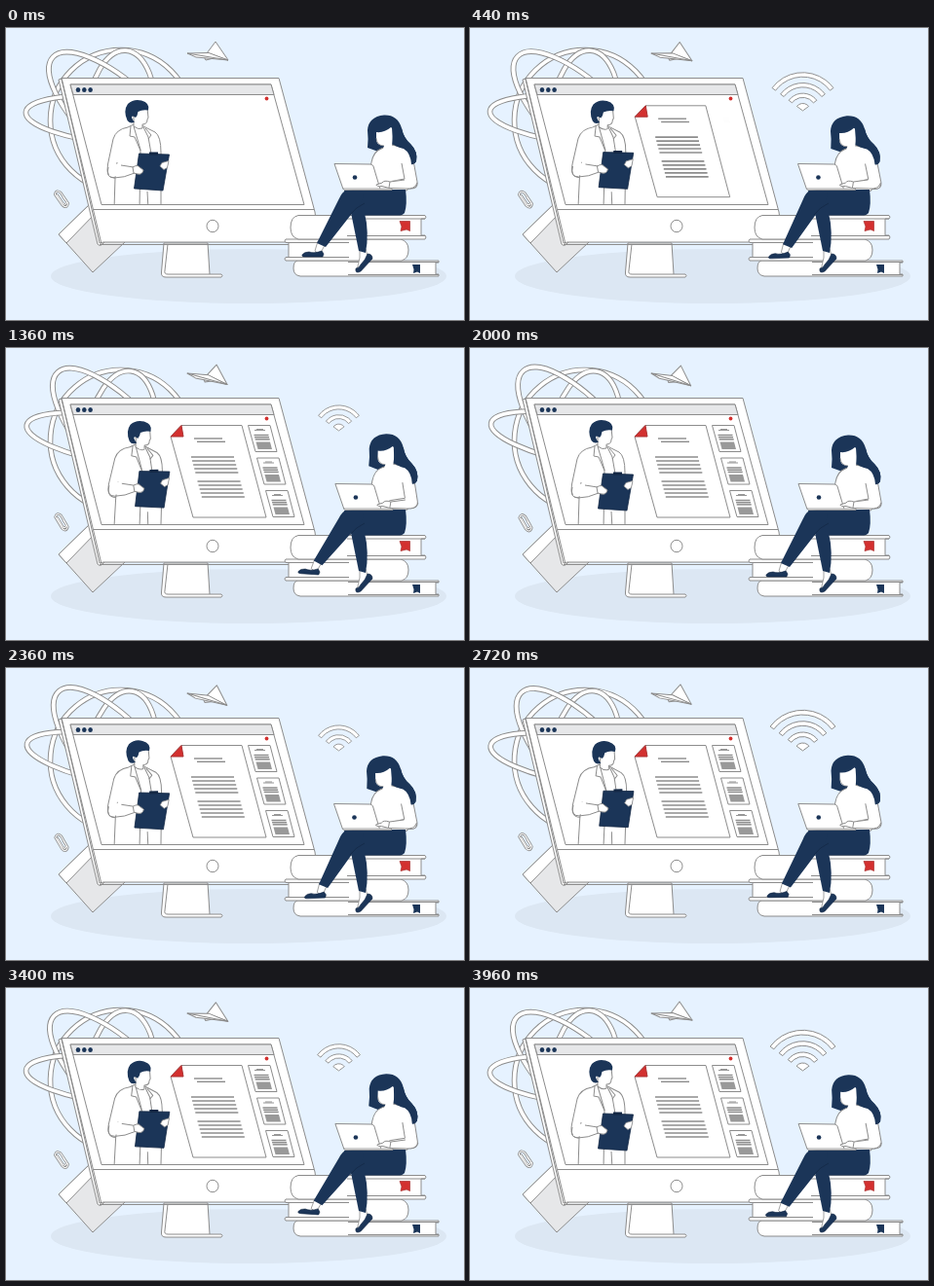
Recreate the animation shown at these times as an HTML page with a canvas. Size 470x300 px, loop 4 s.

```html
<!DOCTYPE html>
<html lang="en">
<head>
<meta charset="utf-8">
<title>Online consultation</title>
<style>
html, body { margin: 0; width: 100%; height: 100%; overflow: hidden; background: #e6f2ff; }
canvas { display: block; width: 470px; height: 300px; }
</style>
</head>
<body>
<canvas id="stage"></canvas>
<script>
const LOOP = 4000;
const NAVY = '#1b3558', DARK = '#132744', RED = '#d3302f';
const LINE = '#8c8c8c', PALE = '#e6e7e9', WHITE = '#fff';
const canvas = document.getElementById('stage');
const ratio = window.devicePixelRatio || 1;
canvas.width = 470 * ratio;
canvas.height = 300 * ratio;
const ctx = canvas.getContext('2d');

const clamp = v => Math.max(0, Math.min(1, v));
const easeOut = v => 1 - (1 - clamp(v)) ** 3;
// Smooth 0..1..0 swing
const swing = (t, period, lag = 0) => (1 - Math.cos(2 * Math.PI * (t - lag) / period)) / 2;

function shape(d, fill = WHITE, stroke = LINE, width = 1) {
  const path = new Path2D(d);
  if (fill) { ctx.fillStyle = fill; ctx.fill(path); }
  if (stroke) { ctx.strokeStyle = stroke; ctx.lineWidth = width; ctx.stroke(path); }
}
const line = (d, color = LINE, width = 1) => shape(d, null, color, width);
const solid = (d, color = NAVY) => shape(d, color, null);

function dot(x, y, rx, ry, fill, stroke) {
  ctx.beginPath();
  ctx.ellipse(x, y, rx, ry, 0, 0, 7);
  ctx.fillStyle = fill;
  ctx.fill();
  if (stroke) { ctx.strokeStyle = stroke; ctx.lineWidth = 1; ctx.stroke(); }
}

function group(draw) {
  ctx.save();
  draw();
  ctx.restore();
}

function turn(x, y, degrees, scale = 1) {
  ctx.translate(x, y);
  ctx.rotate(degrees * Math.PI / 180);
  ctx.scale(scale, scale);
  ctx.translate(-x, -y);
}

function ring(x, y, rx, ry, degrees) {
  ctx.beginPath();
  ctx.ellipse(x, y, rx, ry, degrees * Math.PI / 180, 0, 2 * Math.PI);
  ctx.strokeStyle = LINE;
  ctx.lineWidth = 5.6;
  ctx.stroke();
  ctx.strokeStyle = WHITE;
  ctx.lineWidth = 3.7;
  ctx.stroke();
}

function globe(t) {
  group(() => {
    turn(118, 95, 5.5 * swing(t, LOOP));
    ring(118, 95, 72.5, 72.5, 0);
    ring(118, 95, 36, 72, 4);
    ring(118, 95, 95.5, 36, 43);
    ring(118, 95, 98, 24.5, 5);
  });
}

function plane(t) {
  group(() => {
    turn(186, 26, 8 * swing(t, LOOP));
    shape('M215 14L228 33L206 26Z');
    shape('M203 29.5L205 33L213 31Z', PALE);
    shape('M186 26L208 25.5L228 33L195 30Z');
    line('M186 26L228 33');
  });
}

function clip(t) {
  group(() => {
    const s = swing(t, LOOP);
    ctx.translate(0, 4 * s);
    turn(57, 176, 5 * s - 8);
    const d = 'M53 171L58 181Q61 183 62 179L57 169Q53 165 51 170L57 182Q61 187 63 181L59 174';
    ctx.lineCap = ctx.lineJoin = 'round';
    line(d, LINE, 2.6);
    line(d, WHITE, 1);
  });
}

function folder() {
  shape('M54 212L87 180L122 220L89 251Z', PALE);
  shape('M54 212L87 180L94 188L62 221Z');
}

function monitor() {
  shape('M162 221L159.5 251Q159 256 164 256H221Q223 254.5 221 253H209L207 221Z');
  line('M166 222L163 249Q162 253 166 253H209');
  shape('M57 52L54 53L94 222Q95 224 98 223L101 220Z');
  shape('M57 51.5H280L317 189Q318 193 318 220H100L96 221Z');
  line('M90 186.5H316');
  line('M57 52L98 222M96 222.5H318');
  shape('M66 58H272L306 181.5H98Z');
  shape('M66 58H272L275 68.5H69Z', PALE);
  [74, 80.3, 86.6].forEach(x => dot(x, 63.5, 2.3, 2.5, NAVY));
  dot(267.5, 72.5, 1.9, 1.9, RED);
  dot(212, 203.5, 6, 6.2, WHITE, LINE);
}

function textLines(x, y, count, length, step, width) {
  for (let i = 0; i < count; i++) {
    line(`M${x + i * step * 0.27} ${y + i * step}h${length}`, LINE, width);
  }
}

function pop(t, start, length, x, y, draw) {
  const k = easeOut((t - start) / length);
  if (!k) return;
  group(() => {
    ctx.globalAlpha = clamp(k * 1.5);
    turn(x, y, 0, 0.4 + 0.6 * k);
    draw();
  });
}

function page() {
  shape('M180 79.5H242L267 174H192L169 91Z');
  shape('M180 79.5L182 91H169Z', RED, '#a33');
  textLines(193, 93, 1, 29, 3, 1.4);
  textLines(196, 96.3, 1, 29, 3, 1.4);
  textLines(190, 112, 5, 44, 4, 1.7);
  textLines(196.5, 137, 5, 44, 4, 1.7);
}

function thumb() {
  shape('M248.5 79.5H271L278 106.5H256Z');
  line('M257 83.5h7M255 84.5h11', LINE, 0.9);
  textLines(254.5, 89.5, 3, 15, 2.2, 1.5);
  solid('M256.5 96.5h14.5l2 7.5h-14.5Z', '#999');
}

function papers(t) {
  pop(t, 160, 360, 218, 127, page);
  for (let i = 0; i < 3; i++) {
    pop(t, 440 + i * 240, 260, 263 + i * 9, 93 + i * 33.5, () => {
      ctx.translate(i * 9, i * 33.5);
      thumb();
    });
  }
}

function doctor(t) {
  const s = swing(t, 2000);
  group(() => {
    ctx.clip(new Path2D('M69 69H275L306 181H98Z'));
    group(() => {
      turn(134, 181, 2.1 * s);
      shape('M125 102Q113 104 110 114L104.5 140Q102 154 112 154L111 186H159V165L159 128Q159 111 153 107L141 101L131 99Z');
      line('M112 154L114 138M137 186L138 125L131 101M146 186L145 168M141 102L146 112L149 129');
      line('M128 101L127 111L132 112L138 126M143 103L149 110L146 114');
      group(() => {
        ctx.translate(0, 1.3 * s);
        shape('M131 90V101Q136 105 140 103V99Q145 99 145 94L146 92L145 82H131Z');
        solid('M124.5 95Q120 85 125 78Q131 72.5 139 74.5Q148 77 146 84.5Q140 83.5 135.5 86Q135 90 133 92Q129 89 129 92Q130 95 132 96.5Q127 99 124.5 95Z');
      });
    });
    group(() => {
      ctx.translate(s, -3.7 * s);
      turn(148, 147, -1.5 * s);
      shape('M136.5 129L167.5 130L161 167L131.5 165Z', NAVY, DARK, 0.8);
      solid('M147 127.5h9v3h-9Z', DARK);
      shape('M167 136.5L160 138.5L158 142L162 145.5L165.5 143.5Z', WHITE, LINE, 0.8);
    });
    group(() => {
      ctx.translate(1.2 * s, -2.5 * s);
      solid('M106 142V152L117 152.5L131 148L129 142L116 139Z', WHITE);
      line('M105 143Q102 154 111 154Q121 154 132 149M131 143L118 141');
      shape('M130 143Q135 140 137 143L141 146Q140 151 135 150L131 149Z');
    });
  });
}

function wifi(t) {
  const p = t % 1000 / 1000;
  const sector = (outer, inner) => {
    const a = -Math.PI / 2 - 0.93, b = -Math.PI / 2 + 0.93;
    ctx.beginPath();
    ctx.arc(341.5, 85, outer, a, b);
    if (inner) ctx.arc(341.5, 85, inner, b, a, true);
    else ctx.lineTo(341.5, 85);
    ctx.closePath();
    ctx.fillStyle = WHITE;
    ctx.fill();
    ctx.strokeStyle = LINE;
    ctx.lineWidth = 1;
    ctx.stroke();
  };
  group(() => {
    turn(341.5, 85, 0, Math.min(1, 0.5 + p));
    [[0.08, 8, 0], [0.18, 19, 14.5], [0.28, 30.3, 25.7], [0.42, 41.7, 37]].forEach(([start, outer, inner]) => {
      if (p >= start) sector(outer, inner);
    });
  });
}

function books() {
  shape('M299 239H444V241H441V253H444V255H302Q295 254 295 247Q295 240 299 239Z');
  line('M351 240.5H444M351 253.5H444');
  solid('M417 243H425V252L422 250.5L418 252L418.5 248Z');
  shape('M287 217H405Q413 219 413 228Q413 237 406 239H287Q285 237 287 235.5H290V220.5H287Q285 219 287 217Z');
  line('M288 220.5H352M288 235.5H352');
  shape('M300 192.5H430Q432 194 430 196H426V213H430Q432 215 430 217H300Q292 215 292 205Q292 194 300 192.5Z');
  line('M350 196H430M350 213.5H430');
  shape('M404 198.5H414.5V208.5L411 207L405 208.5L406 204Z', RED, '#a33', 0.7);
}

function woman(t) {
  const w = (swing(t, 2000, 420) - 0.375) / 0.625;

  // Torso and head
  group(() => {
    turn(392, 170, 1.5 * w);
    ctx.translate(0, -1.2 * w);
    solid('M388 89.5Q402 89 406 103Q408 113 415 119Q423 127 421 137Q418 142 411 141L385 128L371 123Q372 113 371 105Q372 91 388 89.5Z');
    shape('M385 124Q377 127 375 138L373 150L379 167H411L413 165Q423 166 422 158L418 136Q415 123 404 122L396 120Z');
    line('M406 139L409 155M409 155L393 158');
    shape('M380 107Q388 108 395 102Q399 104 397 111L396 121Q391 126 387 124L388 121Q380 121 380 114Z', WHITE, null);
    line('M388 121Q381 121 380 113', LINE, 0.7);
    solid('M396 102L406 103Q408 113 415 119Q423 127 421 137Q419 141 416 140Q415 128 408 124Q400 122 397 119Z');
  });

  // Legs
  group(() => {
    solid('M347 167Q360 165 374 166L410 166Q412 181 409 190Q407 193 400 192.5H366L353 190Z');
    shape('M363 226V236L360 249H364L372 237L369 227Z', WHITE, LINE, 0.8);
    solid('M352 180L362 229L369 231Q373 210 368 190Z');
    shape('M371 232Q376 232 376 237L364 250Q358 253 359 247Q362 247 364 243Q369 238 371 232Z', NAVY, DARK, 0.6);
  });
  group(() => {
    turn(352, 173, 4 * w);
    shape('M320 219L317 229L322 233L327 223Z', WHITE, LINE, 0.8);
    solid('M349 167Q345 168 341.5 176L319 221L328 225L357 188Q369 176 366 168Z');
    shape('M304 233Q306 230 311 230Q316 232 324 229L326 232L325 235H307Q303 235 304 233Z', NAVY, DARK, 0.6);
  });
  line('M353 192Q359 184 368 180', DARK, 0.7);

  // Laptop and hands
  group(() => {
    ctx.translate(0.9 * w, 0);
    shape('M337 139.5L374 140Q376 140 377 142L384 165.5H346Z');
    shape('M346 165H396V166.5H347Z', WHITE, LINE, 0.8);
    dot(358, 153.5, 2.3, 2.3, NAVY);
    shape('M396 157Q389 156 387 159L380 161Q380 163 386 163L393 164.5L410 165Q419 165 421 160L409 156Z', WHITE, null);
    line('M409 156L394 158Q388 156 386 159L380 161Q380 163 386 162.5L393 164.5L410 165Q420 166 422 159M394 158L393 164');
  });
}

function frame(now) {
  const t = now % LOOP;
  ctx.setTransform(ratio, 0, 0, ratio, 0, 0);
  ctx.lineJoin = 'round';
  ctx.fillStyle = '#e6f2ff';
  ctx.fillRect(0, 0, 470, 300);
  dot(249, 255, 203, 28, '#dce7f3');
  globe(t);
  plane(t);
  clip(t);
  folder();
  monitor();
  doctor(t);
  papers(t);
  wifi(t);
  books();
  woman(t);
}

const begin = performance.now();
function tick() {
  frame(performance.now() - begin);
  requestAnimationFrame(tick);
}
tick();
</script>
</body>
</html>
```
